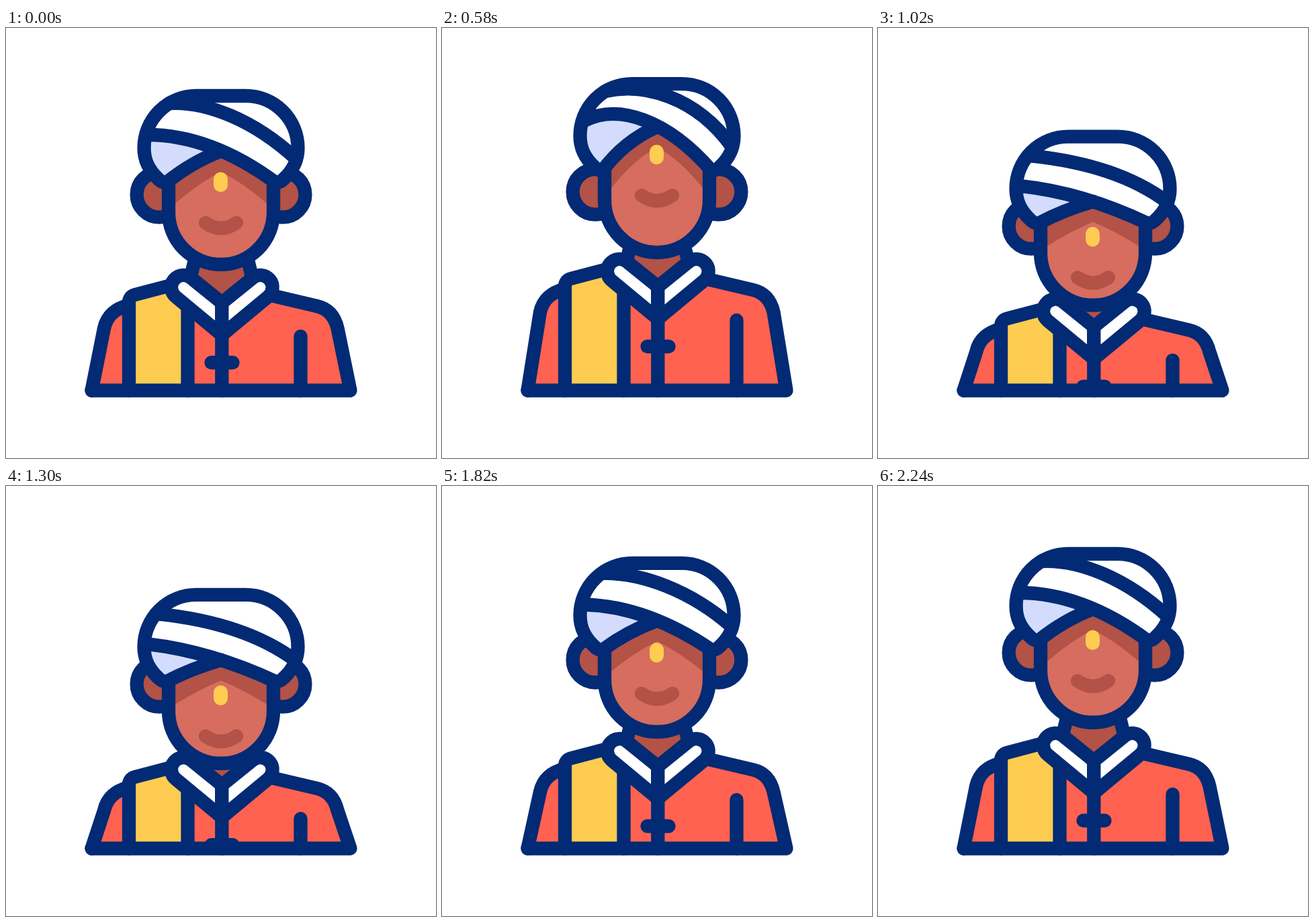
These frames come from a looping animation (640x640 px, 2.4 s). An HTML page with a canvas:

```html
<!DOCTYPE html>
<html>
<head>
<meta charset="utf-8">
<style>
html, body { margin: 0; height: 100%; overflow: hidden; background: #fff; }
canvas { display: block; width: 640px; height: 640px; }
</style>
</head>
<body>
<canvas id="stage" width="640" height="640"></canvas>
<script>
const ctx = document.getElementById('stage').getContext('2d');
const LOOP = 2400, STRETCHED = 550, SUNK = 1110, SETTLED = 2240;
const FLOOR = 539.5;
const NAVY = '#032a74', RED = '#ff6250', YELLOW = '#fdcc50', WHITE = '#fff';
const LAVENDER = '#d3dcfd', SKIN = '#d66d5e', SHADE = '#b35246';

// cubic-bezier(.6, 0, .4, 1) between two times, solved by bisection
function ease(t, from, to) {
  const x = Math.min(1, Math.max(0, (t - from) / (to - from)));
  let lo = 0, hi = 1;
  for (let i = 0; i < 24; i++) {
    const s = (lo + hi) / 2;
    if (1.8 * s - 2.4 * s * s + 1.6 * s ** 3 < x) lo = s; else hi = s;
  }
  return lo * lo * (3 - 2 * lo);
}

function fill(d, color) {
  ctx.fillStyle = color;
  ctx.fill(new Path2D(d));
}

function line(d, color = NAVY, width = 20.3) {
  ctx.strokeStyle = color;
  ctx.lineWidth = width;
  ctx.stroke(new Path2D(d));
}

function shape(d, color) {
  fill(d, color);
  line(d);
}

function placed(dy, draw, flipAxis) {
  ctx.save();
  ctx.translate(0, dy);
  if (flipAxis) {
    ctx.translate(2 * flipAxis, 0);
    ctx.scale(-1, 1);
  }
  draw();
  ctx.restore();
}

// The hem stays on the floor while everything above it moves by dy
function drawBody(dy) {
  const y = v => v + dy;
  const leftSide = `M127.5,${FLOOR}L146,${y(447)}C150.5,${y(427)} 163,${y(418)} 183,${y(412)}`;
  const rightSide = `L395,${y(398)}L463,${y(414)}C478,${y(417.5)} 489,${y(428)} 493.5,${y(447)}L512.5,${FLOOR}`;
  const strap = `M183,${FLOOR}V${y(409)}Q183,${y(399.5)} 192,${y(397)}L249,${y(382)}`;
  const collar = 'M321.3,409L275.5,372A18 18 0 0 0 252.6,400L321.3,457Z';

  placed(dy, () => {
    fill('M280,340H361L367,372L321,409L275,372Z', SHADE);
    line('M281,345L275,370M360,345L366,370');
  });
  fill(`${leftSide}L253,${y(400)}L321,${y(455)}${rightSide}Z`, RED);
  fill(`${strap}L270.5,${y(414)}V${FLOOR}Z`, YELLOW);
  line(leftSide);
  line(strap);
  line(`M270.5,${FLOOR}V${y(414)}M438.5,${FLOOR}V${y(459)}M321.3,${FLOOR}V${y(409)}`);
  line(`M${rightSide.slice(1)}H127.5`);
  placed(dy, () => line('M305.5,498H337.5'));
  for (const axis of [0, 321.3]) placed(dy, () => shape(collar, WHITE), axis);
}

function drawEars() {
  for (const axis of [0, 320]) {
    placed(0, () => shape('M194.6,248a33.7 33.7 0 1 1 67.4 0a33.7 33.7 0 1 1 -67.4 0', SHADE), axis);
  }
}

function drawFace(up, down) {
  const face = 'M242,230V274A78 78 0 0 0 398,274V230';
  const edge = 261 - 5 * up + 3 * down;
  const bend = 230 - 19 * up + 12 * down;
  const peak = 214 - 18 * up + 15 * down;
  fill(`${face}L320,165Z`, SKIN);
  fill(`M242,${edge + 8}L252,${edge}Q288,${bend} 320,${peak}Q352,${bend} 388,${edge}L398,${edge + 8}V220L320,160L242,220Z`, SHADE);
  line(face);
}

function drawFeatures() {
  line('M319.5,225V233.5', YELLOW, 21);
  line('M297,290Q320,306 343,290', SHADE);
}

function drawTurban(up, down) {
  const upper = `M${243 - 17 * down},${112 + 18 * down}`
    + `C${300 - 10 * down},${109 - 10 * up + 28 * down} ${370 + 8 * up},${138 - 18 * up + 16 * down} 431,${194 + 5 * down}`;
  const lower = `M212,${159 - 3 * up + 16 * down}`
    + `C${270 - 8 * up},${159 - 29 * up + 23 * down} 335,${181 - 27 * up + 19 * down} 401,230`;
  const fold = `Q${276 - 4 * up},${200 - 14 * up + 11 * down} 320,${183 - 18 * up + 15.5 * down}`;
  const rightToTop = 'Q407,231 413,225C427,212 434.5,198 434.5,178.5A77.5 77.5 0 0 0 357,101H283A77.5 77.5 0 0 0 205.5,178.5';
  const outline = `M401,230${rightToTop}C205.5,198 213,212 227,225Q233,231 239,230${fold}`;

  fill(outline, LAVENDER);
  fill(lower + rightToTop, WHITE);
  line(outline);
  line(lower);
  line(upper);
}

function render(t) {
  const fall = ease(t, STRETCHED, SUNK);
  const up = ease(t, 0, STRETCHED) - fall;
  const down = fall - ease(t, SUNK, SETTLED);
  const head = 63 * down - 18.2 * up;

  ctx.fillStyle = WHITE;
  ctx.fillRect(0, 0, 640, 640);
  drawBody(37.3 * down - 24.2 * up);
  placed(48.5 * down - 4.3 * up, drawEars);
  placed(head, () => drawFace(up, down));
  placed(85 * down - 41.2 * up, drawFeatures);
  placed(head, () => drawTurban(up, down));
}

ctx.lineCap = ctx.lineJoin = 'round';
const start = performance.now();
function tick() {
  render((performance.now() - start) % LOOP);
  requestAnimationFrame(tick);
}
tick();
</script>
</body>
</html>
```
